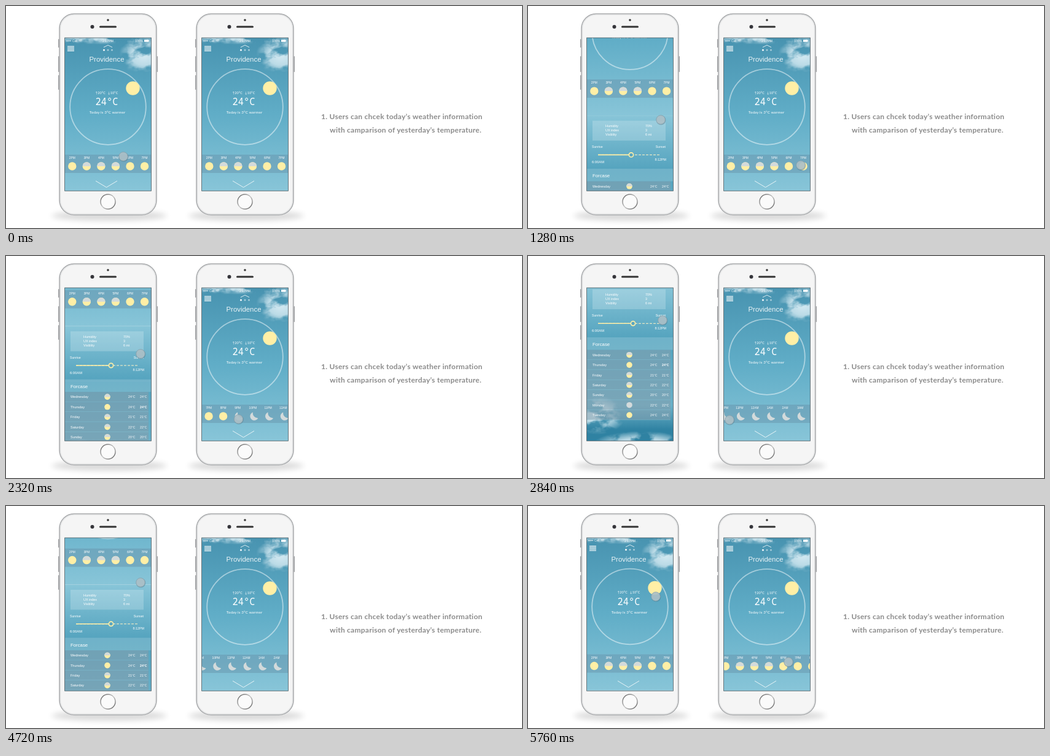
An HTML page that plays this animation: 840x363 px, repeating every 5800 ms.

```html
<!DOCTYPE html>
<html lang="en">
<head>
<meta charset="utf-8">
<title>Weather app</title>
<style>
html, body { margin: 0; width: 100%; height: 100%; overflow: hidden; background: #fff; }
svg { display: block; width: 840px; height: 363px; font-family: "Liberation Sans", Arial, sans-serif; }
.note { font: 700 12px Lato, sans-serif; fill: #8b8b8b; letter-spacing: .25px; }
.big { font-family: "Noto Sans Mono", monospace; font-weight: 300; }
.hand { font-family: Lato, sans-serif; letter-spacing: .15px; }
</style>
</head>
<body>
<svg id="stage" viewBox="0 0 840 363"></svg>
<script>
const LOOP = 5800, STEP = 40, SUN = '#ffefa6', GREY = '#d3dadb';

const text = (x, y, size, s, more = '') =>
  `<text x="${x}" y="${y}" font-size="${size}" ${more}>${s}</text>`;
const mid = 'text-anchor="middle"', end = 'text-anchor="end"';
const rect = (x, y, w, h, fill, more = '') =>
  `<rect x="${x}" y="${y}" width="${w}" height="${h}" fill="${fill}" ${more}/>`;
const circle = (x, y, r, fill, more = '') =>
  `<circle cx="${x}" cy="${y}" r="${r}" fill="${fill}" ${more}/>`;
const ellipse = (x, y, rx, ry, fill, more = '') =>
  `<ellipse cx="${x}" cy="${y}" rx="${rx}" ry="${ry}" fill="${fill}" ${more}/>`;
const line = (d, color, width, more = '') =>
  `<path d="${d}" fill="none" stroke="${color}" stroke-width="${width}" ${more}/>`;
const stops = colors => colors.map((c, i) =>
  `<stop offset="${i / (colors.length - 1)}" stop-color="${c}"/>`).join('');

const hazySun = (x, y, r) => circle(x, y, r, SUN) +
  `<path d="M${x - r} ${y}a${r} ${r} 0 0 1 ${2 * r} 0z" fill="${GREY}"/>`;
const moon = (x, y) =>
  `<path transform="translate(${x} ${y})" d="M-2-6.4A6.8 6.8 0 1 0 6.4 3A8 8 0 0 1-2-6.4z" fill="${GREY}"/>`;

function hours() {
  let out = '';
  for (let i = 0; i < 18; i++) {
    const x = 107.8 + 23.55 * Math.min(i, 7) + 24.7 * Math.max(0, i - 7);
    const h = (i + 14) % 24;
    out += text(x, 250, 4.8, (h % 12 || 12) + (h < 12 ? 'AM' : 'PM'), mid);
    out += i > 0 && i < 4 ? hazySun(x, 262, 6.7)
      : i > 6 && i < 16 ? moon(x + 2, 262) : circle(x, 262, 6.7, SUN);
  }
  return out;
}

function header() {
  let out = '';
  for (let i = 0; i < 4; i++) {
    out += circle(99 + i * 2.1, 57, .8, '#fff') + rect(100, 65.5 + i * 2.4, 11, 1.2, '#fff');
    if (i < 3) out += circle(159.5 + i * 6.5, 72, 1.5, '#fff', i ? 'opacity=".5"' : '');
  }
  return out + text(108, 58.8, 4.8, 'Cell') +
    line('M119 56q2.5-2 5 0M120.3 57.4q1.2-1 2.4 0', '#fff', .7) +
    text(166, 59, 5.2, '2:17PM', mid) + text(223, 59, 5, '100%', end) +
    rect(225, 55.2, 7, 3.5, '#fff') + rect(232.3, 56, .8, 2, '#fff') +
    line('M159 67.5L166 64L173 67.5', '#fff', .8) +
    text(164, 91, 11.4, 'Providence', mid + ' opacity=".88"');
}

const today = () =>
  circle(166, 165, 61.8, 'none', 'stroke="#fff" stroke-opacity=".48" stroke-width="1.8"') +
  circle(206.5, 134.5, 11.2, SUN) +
  text(145, 143.7, 5.4, '↑20°C', 'class="hand"') + text(165.5, 143.7, 5.4, '↓10°C', 'class="hand"') +
  text(164, 162, 15.4, '24°C', mid + ' class="big"') +
  text(165, 176, 6.2, 'Today is 3°C warmer', mid + ' class="hand"');

function details() {
  let out = rect(105, 310.5, 119, 32.5, '#fff', 'opacity=".2"');
  [['Humidity', '70%'], ['UX index', '3'], ['Visiblity', '6 mi']].forEach(([name, value], i) => {
    out += text(126, 321 + i * 7, 5.4, name) + text(191, 321 + i * 7, 5.4, value);
  });
  return out + text(104, 355.2, 5.2, 'Sunrise') + text(224, 355.2, 5.2, 'Sunset', end) +
    text(104, 380, 5.8, '6:00AM') + text(225, 375.5, 5.4, '8:12PM', end) +
    line('M114 366.3H215', '#fff3c4', 1, 'stroke-dasharray="4 2"') +
    `<g clip-path="url(#track)"><g class="dial">${line('M57 366.3H167', SUN, 1.6)}` +
    circle(171, 366.3, 3.6, '#5aa6c1', `stroke="${SUN}" stroke-width="1.7"`) + '</g></g>';
}

function forecast() {
  const days = ['Wednesday', 'Thursday', 'Friday', 'Saturday', 'Sunday', 'Monday', 'Tuesday'];
  const temps = [24, 24, 21, 22, 20, 22, 24];
  let out = rect(96, 389, 140, 20.5, '#fff', 'opacity=".16"') + text(105, 403.4, 7.8, 'Forcase');
  days.forEach((day, i) => {
    const y = 417.7 + i * 16.4, t = temps[i] + '°C';
    out += rect(96, y - 8.2, 136, 15.8, '#869fae', 'opacity=".55"') +
      rect(96, y + 7.5, 136, .6, '#a8cbd8', 'opacity=".5"') +
      text(105, y + 2, 5.5, day) + text(199, y + 2, 5.2, t) +
      text(218, y + 2, 5.2, t, i == 1 ? 'font-weight="700"' : '') +
      (i == 1 || i == 6 ? circle(165, y, 4.8, SUN)
        : i == 5 ? circle(165, y, 4.8, GREY) : hazySun(165, y, 4.8));
  });
  return out;
}

// Soft patches, broken up into clouds by seeded noise.
const clouds = () => rect(96, 500, 140, 80, 'url(#dusk)') +
  `<g filter="url(#cloud)">` +
  ellipse(224, 80, 40, 34, 'url(#puff)') + ellipse(150, 50, 90, 13, 'url(#puff)') +
  ellipse(112, 516, 48, 32, 'url(#puff)') + ellipse(185, 564, 80, 22, 'url(#puff)') + '</g>';

const page = () => rect(96, 52, 140, 250, 'url(#day)') + rect(96, 302, 140, 90, 'url(#noon)') +
  rect(96, 391.5, 140, 200, 'url(#late)') + clouds() +
  `<g fill="#fff">${header()}${today()}` + rect(96, 243, 140, 30, '#648ca5', 'opacity=".42"') +
  `<g class="strip">${hours()}</g>${details()}${forecast()}</g>`;

function phone(id, x) {
  const side = (px, y, h) => rect(px, y, 1.6, h, '#9c9ea0', 'rx=".8"');
  return `<g id="${id}" transform="translate(${x})">
    ${ellipse(168, 343, 94, 8, '#000', 'opacity=".15" filter="url(#shade)"')}
    ${side(85, 54, 14)}${side(85, 82, 26)}${side(85, 113, 24)}${side(245.4, 82, 26)}
    ${rect(87, 12.7, 158, 328.8, '#f5f5f5', 'rx="24" stroke="#a6a8aa" stroke-width="1.5"')}
    ${rect(88.6, 14.3, 154.8, 325.6, 'none', 'rx="22.5" stroke="#e2e3e4" stroke-width="1.2"')}
    ${circle(166, 23, 1.8, '#333')}${circle(140.5, 34, 3, '#35353a')}
    ${rect(152, 32.4, 28, 3, '#333', 'rx="1.5"')}
    ${circle(166, 320, 12, '#fbfbfb', 'stroke="url(#ring)" stroke-width="1.4"')}
    <g clip-path="url(#screen)">
      <g class="page">${page()}</g>
      ${line('M146 286L163.5 296.5L181 286', '#fff', .8, 'class="hint"')}
      <g class="touch">${circle(.5, .8, 7.8, '#35596a', 'opacity=".3"')}
      ${circle(0, 0, 7.3, '#b1c3ca', 'fill-opacity=".88" stroke="#86a0ab" stroke-width=".8"')}</g>
    </g>
    ${rect(95.6, 52, 140.8, 250.3, 'none', 'stroke="#45575f" stroke-width=".8"')}
  </g>`;
}

const down = (id, ...colors) =>
  `<linearGradient id="${id}" x2="0" y2="1">${stops(colors)}</linearGradient>`;
const stage = document.getElementById('stage');
stage.innerHTML = `<defs>
  ${down('day', '#4893b0', '#60adc7', '#88c5d8')}
  ${down('noon', '#88c5d8', '#54a3be')}
  ${down('late', '#54a3be', '#7dbbd0')}
  ${down('dusk', '#2f82a200', '#2f82a2', '#2f82a2')}
  <linearGradient id="ring" x2="1" y2="1">${stops(['#555', '#c4c4c4', '#555'])}</linearGradient>
  <radialGradient id="puff">${stops(['#fff', '#fffc', '#fff0'])}</radialGradient>
  <filter id="cloud" filterUnits="userSpaceOnUse" x="96" y="52" width="140" height="540" color-interpolation-filters="sRGB">
    <feTurbulence type="fractalNoise" baseFrequency=".035 .05" numOctaves="4" seed="8"/>
    <feColorMatrix values="0 0 0 0 .84  0 0 0 0 .92  0 0 0 0 .95  4.5 0 0 0 -1.8"/>
    <feComposite operator="in" in2="SourceGraphic"/>
  </filter>
  <filter id="shade" x="-20%" y="-200%" width="140%" height="500%"><feGaussianBlur stdDeviation="5"/></filter>
  <clipPath id="screen"><rect x="96" y="52" width="140" height="250"/></clipPath>
  <clipPath id="track"><rect x="114" y="360" width="120" height="13"/></clipPath>
  </defs>` + phone('scroller', 0) + phone('swiper', 223) +
  text(513, 185, 12, '1. Users can chcek today’s weather information', 'class="note"') +
  text(527, 206.5, 12, 'with camparison of yesterday’s temperature.', 'class="note"');

const find = s => stage.querySelector(s);
const move = (el, x, y) => el.setAttribute('transform', `translate(${x} ${y})`);
const pageEl = find('#scroller .page'), hint = find('#scroller .hint'), dial = find('#scroller .dial');
const strip = find('#swiper .strip'), touchL = find('#scroller .touch'), touchR = find('#swiper .touch');

function draw(now) {
  const t = Math.floor(now % LOOP / STEP) * STEP;
  const part = (a, b) => Math.min(1, Math.max(0, (t - a) / (b - a)));
  const ease = (a, b) => part(a, b) ** 2 * (3 - 2 * part(a, b));

  const scroll = 141 * ease(0, 1650) + 115 * ease(1920, 2840) -
    82.5 * part(2840, 4720) ** 1.5 - 173 * ease(4720, 5760);
  move(pageEl, 0, -scroll);
  hint.setAttribute('opacity', Math.max(0, 1 - scroll / 40));
  move(dial, -57 * (1 - part(600, 1690)) ** 3, 0);
  move(touchL, 191 + 28 * ease(0, 1600) - 11 * ease(4720, 5760),
    246 - 60 * ease(0, 1280) + 11 * ease(1280, 1920) - 92 * ease(1920, 2840) +
    35 * ease(2840, 3760) - 15 * ease(3760, 4720) + 23 * ease(4720, 5760));

  move(strip, -256 * (ease(1220, 3535) - ease(3990, 5990)), 0);
  move(touchR, 252 - 46 * ease(600, 1700) - 101 * ease(1800, 2840) +
    147 * ease(3380, 4720) - 51 * ease(5200, 5760),
    255 + 13 * Math.sin(Math.PI * t / LOOP) ** 2);
  requestAnimationFrame(() => draw(performance.now() - start));
}
const start = performance.now();
draw(0);
</script>
</body>
</html>
```
